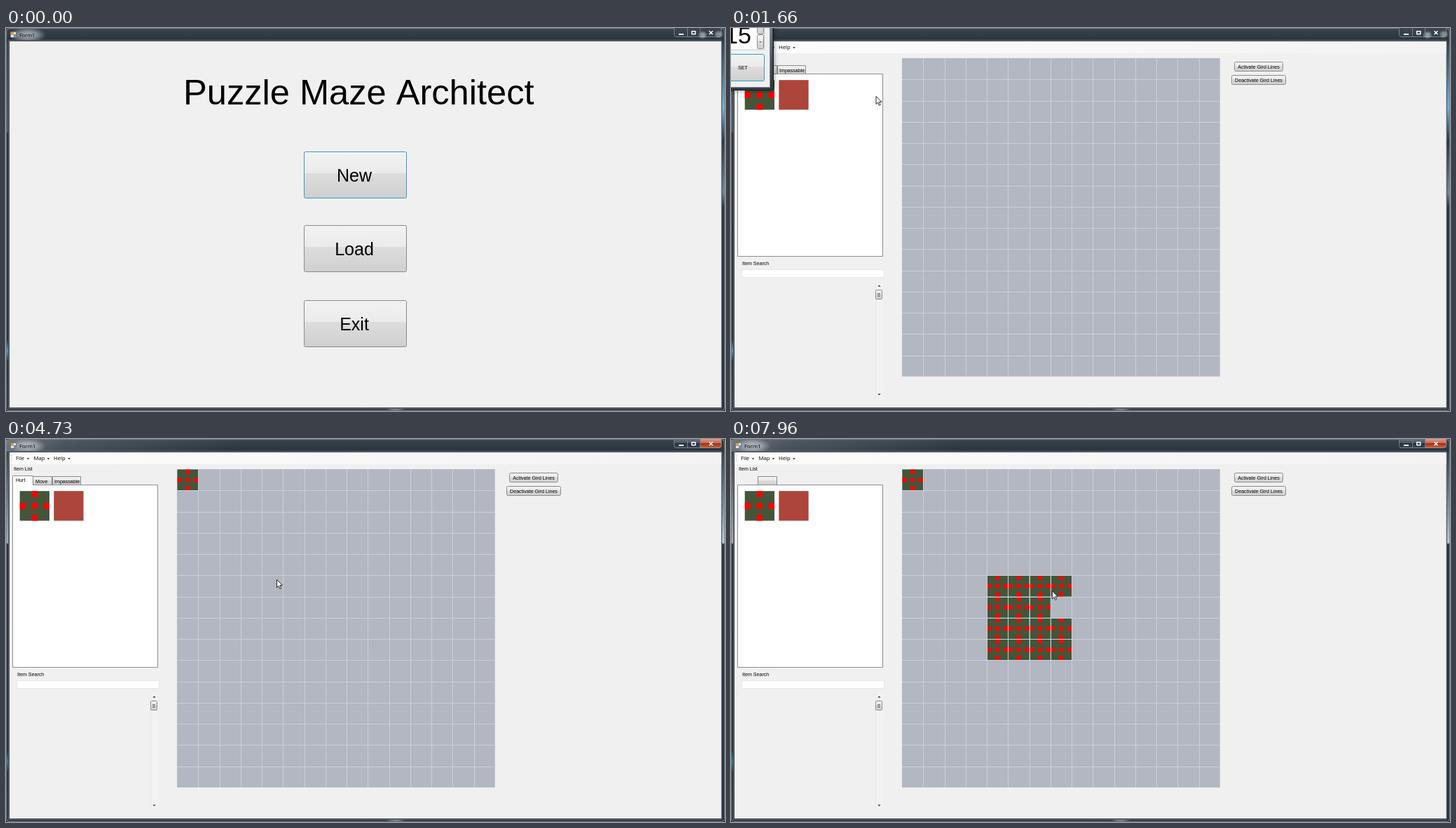
Animation, 1026 px wide and 546 px high, one loop 8 s. Source, as an HTML page with a canvas:

```html
<!DOCTYPE html>
<html lang="en">
<head>
<meta charset="utf-8">
<title>Map editor</title>
<style>
html, body { margin: 0; width: 100%; height: 100%; overflow: hidden; background: #f0f0f0; }
canvas { display: block; }
</style>
</head>
<body>
<canvas id="stage" width="1026" height="546"></canvas>
<script>
const ctx = document.getElementById('stage').getContext('2d');
const LOOP = 8000;
const SANS = '"Liberation Sans", Arial, sans-serif';
const UI = '"Open Sans", "Noto Sans", sans-serif';
const FACE = '#f0f0f0', GRID_FILL = '#b2b7c1', GRID_LINE = '#ccd0d6';
const GRID = { x: 244, y: 43, cell: 30.25, count: 15 };
const GRID_SIDE = GRID.cell * GRID.count;

const ENTER = 100, CLICK_NEW = 850, OPEN_MAP = 970, DIALOG_OPEN = 1200, DIALOG_CLOSE = 2250;
const FIRST_CLICK = 3540, DRAG_START = 4970;

// Each stroke runs at even pace through its points; the pointer rests in between.
const STROKES = [
  { from: ENTER, to: 800, path: [[640, 550], [496, 206]] },
  { from: 1480, to: 1660, path: [[496, 206], [207, 97]] },
  { from: 1660, to: 2050, path: [[207, 97], [17, 56]] },
  { from: 2330, to: 3130, path: [[17, 56], [130, 86], [295, 65]] },
  { from: 3180, to: 3360, path: [[295, 65], [246, 58]] },
  { from: 4150, to: 4560, path: [[246, 58], [386, 200]] },
  { from: DRAG_START, to: 5420, path: [[386, 200], [384, 293]] },
  { from: 5630, to: 5730, path: [[384, 293], [420, 290]] },
  { from: 5910, to: 6700, path: [[420, 283], [411, 212], [432, 206], [446, 243], [465.5, 266.5], [466, 282]] },
  { from: 6750, to: 7550, path: [[466, 284], [462, 300], [453, 304], [442, 274], [441, 246]] },
  { from: 7600, to: LOOP, path: [[441, 246], [449, 212], [460, 217]] }
];

const strokeAt = t => STROKES.findLast(s => t >= s.from);

function pointerAt(t) {
  const { from, to, path } = strokeAt(t);
  const last = path.length - 1;
  const along = Math.min((t - from) / (to - from), 1) * last;
  const i = Math.min(Math.floor(along), last - 1), p = along - i;
  return [0, 1].map(k => path[i][k] + (path[i + 1][k] - path[i][k]) * p);
}

// The held pointer paints every cell it is seen in; the paint shows one step later.
const painted = new Map();
const STEP = 20;
for (let t = FIRST_CLICK; t < LOOP; t += t === FIRST_CLICK ? DRAG_START - FIRST_CLICK : STEP) {
  const [x, y] = pointerAt(t);
  const col = Math.floor((x - GRID.x) / GRID.cell), row = Math.floor((y - GRID.y) / GRID.cell);
  const key = row * GRID.count + col;
  if (!painted.has(key)) painted.set(key, { col, row, at: t + STEP });
}

function seededRandom(seed) {
  return () => (seed = seed * 16807 % 2147483647) / 2147483647;
}

function rect(x, y, w, h, fill) {
  ctx.fillStyle = fill;
  ctx.fillRect(x, y, w, h);
}

function gradient(x0, y0, x1, y1, stops) {
  const g = ctx.createLinearGradient(x0, y0, x1, y1);
  stops.forEach(([at, color]) => g.addColorStop(at, color));
  return g;
}

function frame(x, y, w, h, fill, stroke, radius = 0) {
  ctx.beginPath();
  ctx.roundRect(x, y, w, h, radius);
  if (fill) { ctx.fillStyle = fill; ctx.fill(); }
  if (stroke) { ctx.strokeStyle = stroke; ctx.lineWidth = 1; ctx.stroke(); }
}

function text(str, x, y, size, family = SANS, align = 'left') {
  ctx.font = `${size}px ${family}`;
  ctx.textAlign = align;
  ctx.fillStyle = '#000';
  ctx.fillText(str, x, y);
}

const label = (str, x, y) => text(str, x, y, 7.1);

function polygon(points, fill) {
  ctx.beginPath();
  points.forEach(([x, y]) => ctx.lineTo(x, y));
  ctx.closePath();
  ctx.fillStyle = fill;
  ctx.fill();
}

function arrow(x, y, size, dir = 1, color = '#222') {
  polygon([[x - size, y - dir * size / 2], [x + size, y - dir * size / 2], [x, y + dir * size / 2]], color);
}

function clipped(points, paint) {
  ctx.save();
  ctx.beginPath();
  points.forEach(([x, y]) => ctx.lineTo(x, y));
  ctx.clip();
  paint();
  ctx.restore();
}

function glow(x, y, rx, ry, alpha) {
  ctx.save();
  ctx.translate(x, y);
  ctx.scale(rx, ry);
  const g = ctx.createRadialGradient(0, 0, 0, 0, 0, 1);
  g.addColorStop(0, `rgba(205,212,218,${alpha})`);
  g.addColorStop(.5, `rgba(205,212,218,${alpha * .7})`);
  g.addColorStop(1, 'rgba(205,212,218,0)');
  rect(-1, -1, 2, 2, g);
  ctx.restore();
}

const BUTTON_LOOKS = {
  normal: ['#f2f2f2', '#ebebeb', '#dddddd', '#cfcfcf', '#8a8a8a'],
  focus: ['#f2f2f2', '#ebebeb', '#dddddd', '#cfcfcf', '#2b9fcb'],
  hover: ['#eaf6fd', '#d9f0fc', '#bee6fd', '#a7d9f5', '#3c7fb1'],
  pressed: ['#e5f4fc', '#c4e5f6', '#98d1ef', '#68b3db', '#2c628b']
};

function bevel(x, y, w, h, look = 'normal', radius = 2) {
  const [a, b, c, d, edge] = BUTTON_LOOKS[look];
  const fill = gradient(0, y, 0, y + h, [[0, a], [.46, b], [.46, c], [1, d]]);
  frame(x + .5, y + .5, w - 1, h - 1, fill, edge, radius);
}

function button(str, x, y, w, h, size, look, dx = 0) {
  bevel(x, y, w, h, look);
  text(str, x + w / 2 + dx, y + h / 2 + size * .36, size, SANS, 'center');
}

function drawCaptionButtons(active) {
  frame(953.5, -2.5, 67, 15, gradient(0, 0, 0, 13, active
    ? [[0, '#68727c'], [.45, '#48525c'], [.5, '#28313b'], [1, '#3c4752']]
    : [[0, '#3e4751'], [1, '#323b45']]), '#76818b', 3);
  if (active) {
    frame(990.5, -2.5, 30, 15, gradient(0, 0, 0, 13, [
      [0, '#dc9a8b'], [.45, '#c7674f'], [.5, '#a72c14'], [1, '#cb6844']]), '#8c9095', 3);
  } else {
    glow(994, 10, 7, 6, .7);
    glow(1017, 9, 7, 6, .6);
  }
  for (const x of [972, 990]) rect(x, 0, 1, 12, '#75808a');

  rect(960, 8, 7, 2, '#fff');
  ctx.strokeStyle = '#fff';
  ctx.lineWidth = 1.5;
  ctx.strokeRect(978.7, 4.7, 5, 4);
  ctx.beginPath();
  for (const dir of [-1, 1]) {
    ctx.moveTo(1006 - 2.5 * dir, 4.2);
    ctx.lineTo(1006 + 2.5 * dir, 9.2);
  }
  ctx.stroke();
}

function drawChrome(active, titleSize) {
  rect(0, 0, 1026, 546, '#272e37');
  rect(0, 0, 1026, 19, gradient(0, 0, 0, 19, [[0, '#3a434c'], [1, '#2a323b']]));
  // Glass sides, with the desktop shining through
  rect(0, 19, 5, 525, gradient(0, 19, 0, 544, [
    [0, '#303a44'], [.245, active ? '#a4aeb5' : '#465059'], [.25, '#20262d'],
    [.81, '#20262d'], [.84, active ? '#28709c' : '#3f94d0'], [.87, '#20262d'], [1, '#2a333e']]));
  rect(1021, 19, 5, 525, gradient(0, 19, 0, 544, active
    ? [[0, '#34404a'], [.15, '#7d929e'], [.245, '#c2d0d8'], [.25, '#263039'], [1, '#27303a']]
    : [[0, '#303a44'], [.18, '#73b6df'], [.27, '#27303a'], [.41, '#6f8798'], [.45, '#27303a'], [1, '#27303a']]));
  if (active) {
    rect(0, 1, 330, 17, gradient(0, 0, 330, 0, [
      [0, 'rgba(150,158,163,.6)'], [.25, 'rgba(120,130,137,.35)'], [1, 'rgba(120,130,137,0)']]));
  }
  glow(31, 10, 26, 11, .75);
  glow(556, 543, 14, 3, .6);
  frame(.7, .7, 1024.6, 544.6, null, '#7c868f', 4);
  frame(3.6, 17.6, 1018, 525, null, '#68737d', 1);
  frame(4.5, 18.5, 1016.5, 523, FACE, '#343c45');

  frame(6.5, 5.5, 8, 8, '#e3e5e8', '#6e7780', 1);
  rect(7, 6, 4, 4, '#e69a32');
  rect(11, 9, 3, 4, '#6a91bd');
  text('Form1', 19, 12.5, titleSize, UI);
  drawCaptionButtons(active);
}

function drawMenu(newLook) {
  rect(5, 19, 1015.5, 522, FACE);
  text('Puzzle Maze Architect', 253, 108.5, 50.6);
  ['New', 'Load', 'Exit'].forEach((name, i) => {
    button(name, 425, 176 + 106 * i - i % 2, 147, 67, 25, i ? 'normal' : newLook, -1.5);
  });
}

function drawTile(x, y, size) {
  const u = size / 5;
  rect(x, y, size, size, '#44553a');
  for (const [c, r] of [[2, 0], [0, 2], [2, 2], [4, 2], [2, 4]]) {
    rect(x + c * u, y + r * u, u, u, '#fd0000');
  }
}

function drawTabs(blank) {
  frame(9.5, 65.5, 207, 260, '#fff', '#8c8e94');
  bevel(38, 53, 28, 13, 'normal', 0);
  if (blank) return;
  bevel(66, 53, 41, 13, 'normal', 0);
  frame(9.5, 52.5, 29, 13, '#fff', '#8c8e94');
  rect(10, 64, 28, 3, '#fff');
  label('Hurt', 14, 61.2);
  label('Move', 42, 62.7);
  label('Impassable', 69, 62.7);
}

function drawGrid(t) {
  const { x, y, cell, count } = GRID;
  rect(x, y, GRID_SIDE, GRID_SIDE, GRID_FILL);
  for (const { col, row, at } of painted.values()) {
    if (t >= at) drawTile(x + col * cell + .5, y + row * cell + .5, cell - .5);
  }
  for (let i = 1; i < count; i++) {
    const p = Math.round(i * cell);
    rect(x + p, y, 1, GRID_SIDE, GRID_LINE);
    rect(x, y + p, GRID_SIDE, 1, GRID_LINE);
  }
}

// Patches of the previous screen that the grid has not covered yet
function drawLeftovers() {
  const { x: left } = GRID, edgeAt = y => left + (418 - y) * 1.942;
  clipped([[left, 276], [edgeAt(276), 276], [left, 418]], () => drawMenu('hover'));
  clipped([[left, 225], [550, 225], [550, 258], [edgeAt(276), 276], [left, 276]], () => {
    rect(left, 262, 310, 14, FACE);
    const random = seededRandom(7);
    for (let y = 256; y < 276; y += 5) {
      for (let x = left; x < edgeAt(y); x += 10.5) {
        rect(x, y, 10.5, 5, random() < .5 ? FACE : GRID_FILL);
      }
    }
    for (let k = 0; k < 5; k++) {
      for (let i = 0; i < 4; i++) {
        rect(246 + 73.6 * k - 10.3 * i, 232 + 9 * i, 10.5, 8, k > 2 && i === 0 ? '#a8dcf5' : FACE);
      }
    }
  });
}

function drawEditor(t) {
  rect(5, 19, 1015.5, 522, FACE);
  rect(5, 19, 1015.5, 17, gradient(5, 0, 1020, 0, [[0, '#fcfcfc'], [1, '#f3f3f3']]));
  for (let y = 23; y < 33; y += 2.6) rect(7.5, y, 1, 1, '#b5b5b5');
  [['File', 14, 31.5], ['Map', 39.5, 60.5], ['Help', 68, 90]].forEach(([name, x, arrowX]) => {
    text(name, x, 30.4, 7.7, UI);
    arrow(arrowX, 28.2, 1.9);
  });

  label('Item List', 11, 45.4);
  // The tabs flicker while a drag repaints the window
  drawTabs(t >= DRAG_START && t <= strokeAt(t).to && t % 90 >= 35);
  drawTile(19.7, 74.2, 42.3);
  rect(68.3, 74.2, 42.3, 42.3, '#ad453a');

  label('Item Search', 16, 338.2);
  frame(15.5, 344.5, 203, 11, '#fff', '#e3e6ea');
  rect(206, 362, 11, 166, '#f2f2f2');
  rect(206, 362, 1, 166, '#e7e7e7');
  arrow(211.5, 367.5, 2.2, -1);
  arrow(211.5, 522.5, 2.2);
  bevel(206, 373, 10, 14, 'normal', 1);
  for (let y = 378; y < 383; y += 2) rect(209, y, 4, 1, '#666');

  drawGrid(t);
  button('Activate Gird Lines', 718, 48, 70, 14, 7.1);
  button('Deactivate Gird Lines', 714, 67, 78, 14, 7.1);
}

function drawDialog(look) {
  ctx.save();
  ctx.shadowColor = 'rgba(0,0,0,.55)';
  ctx.shadowBlur = 7;
  frame(-20, -20, 80.5, 108.5, '#343d47', null, 4);
  ctx.restore();
  frame(-20, -20, 80.5, 108.5, null, '#171b20', 4);
  rect(56, 0, 3, 84, gradient(0, 0, 0, 84, [[0, '#6f7d88'], [1, '#2c353f']]));
  frame(-10, -10, 65.5, 94.5, FACE, '#838d96');
  frame(-10, -10, 57.5, 41, '#fff', '#c4c8cd');
  text('15', -9, 21.5, 34);
  bevel(37, -11, 10, 20);
  bevel(37, 9, 10, 21);
  arrow(42, 20, 2, 1, '#36859e');
  button('SET', -14, 37, 62, 39, 7.1, look);
}

function drawPointer([x, y]) {
  ctx.save();
  ctx.translate(x + .5, y + .5);
  polygon([[0, 0], [0, 11.3], [2.6, 8.9], [4.4, 13], [6.2, 12.2], [4.4, 8.2], [8, 8.1]], '#fff');
  ctx.strokeStyle = '#111';
  ctx.lineWidth = .9;
  ctx.stroke();
  ctx.restore();
}

function draw(t) {
  const dialog = t >= DIALOG_OPEN && t < DIALOG_CLOSE;
  const pointer = t >= ENTER ? pointerAt(t) : null;
  drawChrome(t >= CLICK_NEW && !dialog, t < CLICK_NEW ? 7.3 : 7.7);

  if (t < OPEN_MAP) {
    const hover = pointer && pointer[0] < 572 && pointer[1] < 243;
    drawMenu(t >= CLICK_NEW && t < CLICK_NEW + 70 ? 'pressed' : hover ? 'hover' : 'focus');
  } else {
    drawEditor(t);
    const { x, y } = GRID, right = x + GRID_SIDE, bottom = y + GRID_SIDE;
    if (t < OPEN_MAP + 50) clipped([[x, y], [right, y], [right, bottom], [x, bottom]], () => drawMenu('hover'));
    else if (t < OPEN_MAP + 100) drawLeftovers();
  }
  if (dialog) drawDialog(t > DIALOG_CLOSE - 70 ? 'pressed' : t > 2020 ? 'hover' : 'focus');
  if (pointer) drawPointer(pointer);
}

const start = performance.now();
function tick() {
  draw((performance.now() - start) % LOOP);
  requestAnimationFrame(tick);
}
tick();
</script>
</body>
</html>
```
